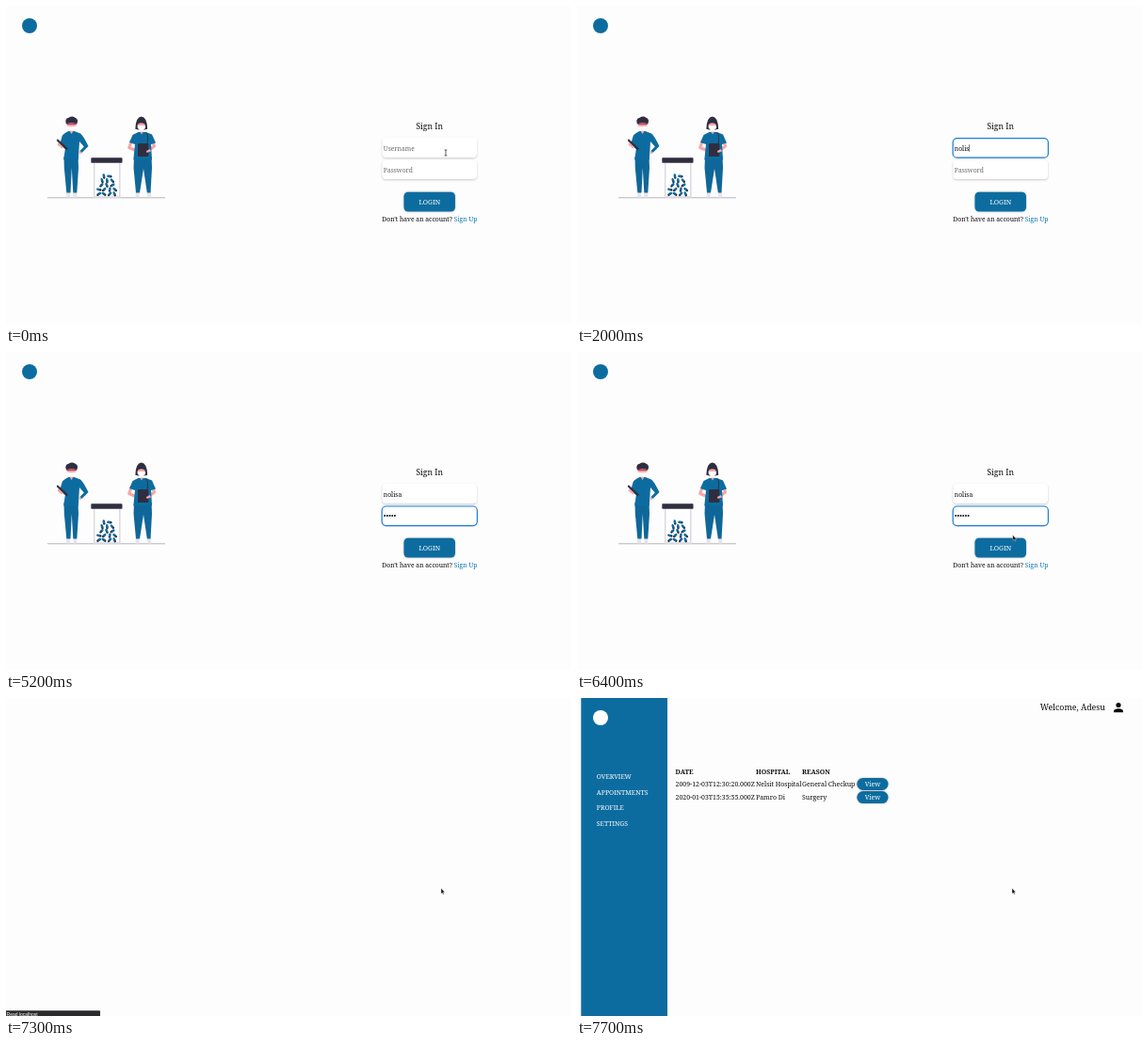
Recreate the animation shown at these times as an HTML page. Size 600 by 338 pixels, loop 8 s.

```html
<!DOCTYPE html>
<html lang="en">
<head>
<meta charset="utf-8">
<title>Sign In</title>
<style>
html, body { margin: 0; width: 100%; height: 100%; overflow: hidden; background: #fdfdfd; }
svg { display: block; width: 600px; height: 338px; font: 6.79px "Noto Serif", serif; fill: #0c0c0c; }
.field { fill: #fff; filter: drop-shadow(0 1px 1.2px #0003); }
.button { fill: #0d6c9f; filter: drop-shadow(0 .8px .9px #0004); }
.white { fill: #fff; }
.hint { fill: #6a6a6a; }
.mid { text-anchor: middle; }
#nav { font-size: 6.95px; fill: #fff; }
#table { font-size: 6.94px; }
#status text { font: 5px "Liberation Sans", Arial, sans-serif; fill: #fff; }
</style>
</head>
<body>
<svg viewBox="0 0 600 338">
  <rect width="600" height="338" fill="#fdfdfd"/>

  <g id="login">
    <circle cx="25" cy="21" r="8" fill="#0d6c9f"/>

    <g id="art">
      <path d="M44 203.800H169" stroke="#96969b" stroke-width=".7"/>
      <g id="man">
        <path d="M64.500 195h3.500v8.500h-4zM71.500 195h3.500l.5 8.500h-4z" fill="#e4e4ea"/>
        <path d="M61.500 160H76.500L77 172L75.300 198.500H71.300L69.800 172L68.500 198.500H64.300L61.800 172Z" fill="#0f6799"/>
        <path d="M66.500 133H72.500L79 135.500Q81.500 137 87.500 149L80 156.500L78 154.500L82.800 149.500L78 144L76.800 163.500H61.200L62.800 152L57 147.500L59.500 138.500Q60 136 66.500 133Z" fill="#0d6c9f"/>
        <path d="M56 144.500l5 5-1.500 2-5-4zM77.800 153.500l3 2-2.600 2.200z" fill="#f7a6a8"/>
        <path d="M54.800 141.300L66 151.500L64.500 153.200L53.600 143Z" fill="#2f2e41"/>
        <ellipse cx="69.600" cy="127" rx="4.900" ry="5.600" fill="#f7a6a8"/>
        <path d="M64.600 127.500Q69.500 129 74.600 127.500V130Q69.500 136 65 130Z" fill="#fff"/>
        <path d="M64 125.500Q61.800 120 66.500 118.800Q70 116.200 73.500 118.800Q77.500 120.500 75.200 125.500Q69.500 122.500 64 125.500Z" fill="#2f2e41"/>
        <path d="M64.500 125.300H74.800" stroke="#a33f55" stroke-width="1.500"/>
        <path d="M67.500 132.700L69.500 136L71.700 132.700" fill="#f7a6a8"/>
      </g>
      <g id="woman">
        <path d="M138 195h3.500v8.500h-4zM150 195h3.500l.8 8.500h-4z" fill="#e4e4ea"/>
        <path d="M136 160H154.500L155 172L153.500 198.500H149.800L146 173L142 198.500H138L135.500 172Z" fill="#0f6799"/>
        <path d="M133.500 143L130.700 150.500L140 154.500M155.500 143L157.500 149L151 154" fill="none" stroke="#f7a6a8" stroke-width="3.100" stroke-linejoin="round"/>
        <path d="M140.500 134H148.500L155 136.500L159 145.500L154 147L155 163.500H135.300L137 147L131 145L134.500 137Z" fill="#0d6c9f"/>
        <path d="M137.300 130.800Q137.800 118 143.700 117.600Q149.800 118 150.200 130.800Q143.700 132.500 137.300 130.800Z" fill="#2f2e41"/>
        <ellipse cx="143.700" cy="127" rx="4" ry="4.500" fill="#f7a6a8"/>
        <path d="M139 126Q139 120 143.700 120T148.500 126Q143.700 122.500 139 126Z" fill="#2f2e41"/>
        <path d="M139.600 127H148V129.800Q143.800 135.500 139.800 129.800Z" fill="#fff"/>
        <path d="M142 133.500H146L144 136.500Z" fill="#f7a6a8"/>
        <path d="M149 134.500Q151.500 138 150 146" fill="none" stroke="#2f2e41" stroke-width=".9"/>
        <rect x="140" y="146" width="11.300" height="14" rx="1" fill="#2f2e41"/>
        <path d="M149 154l4-2 1 2.500-4.500 1.500z" fill="#f7a6a8"/>
      </g>
      <path d="M93.700 167V203H120.800V167" fill="#fff" stroke="#dcdce3" stroke-width="1.600"/>
      <rect x="90.300" y="161.300" width="33.200" height="5.500" rx=".8" fill="#2f2e41"/>
      <g id="pills" stroke-width="2.400" stroke-linecap="round"></g>
    </g>

    <text class="mid" x="449.700" y="131.200" font-size="8.600">Sign In</text>
    <rect class="field" x="399.500" y="140" width="100.500" height="21" rx="4"/>
    <rect class="field" x="399.500" y="163.500" width="100.500" height="20.500" rx="4"/>
    <rect id="ring" x="399.200" width="101.200" height="20.600" rx="4.500" fill="none" stroke="#1d7fdc" stroke-width="1.200"/>
    <text id="user" x="400.800" y="153.500"></text>
    <text id="pass" class="hint" x="400.800" y="176.700">Password</text>
    <g id="dots"></g>
    <rect id="caret" width=".6" height="7.600" fill="#222"/>
    <rect class="button" x="422.500" y="197.700" width="54.500" height="20.800" rx="4.500"/>
    <text class="mid white" x="449.800" y="210.600" font-size="7.100">LOGIN</text>
    <text x="399.300" y="229.300">Don't have an account? <tspan fill="#0e77b0">Sign Up</tspan></text>
  </g>

  <g id="home">
    <rect x="4.300" width="91.700" height="338" fill="#0d6c9f"/>
    <circle class="white" cx="25" cy="21" r="8"/>
    <g id="nav"></g>
    <text x="491.700" y="13.200" font-size="8.900">Welcome, Adesu</text>
    <circle cx="575" cy="7.500" r="2.600"/>
    <path d="M570 15.200V13.700Q570.500 11.200 575 11.200T580 13.700V15.200Z"/>
    <g id="table"></g>
  </g>

  <g id="status">
    <rect x="-2" y="332.300" width="102" height="8" rx="1" fill="#2b2b2d"/>
    <text x=".6" y="337.600"></text>
  </g>

  <g id="mouse">
    <path id="beam" d="M-1.400-3H1.400M0-3V3M-1.400 3H1.400" stroke="#222" stroke-width=".7"/>
    <path id="arrow" d="M0-2.800V3L1.300 1.900L2.200 3.800L3.100 3.400L2.300 1.600H4Z" fill="#111" stroke="#fff" stroke-width=".35"/>
    <path id="hand" d="M-.8-3Q0-3.600.5-2.700V-.6L2.500 0Q3 .3 2.700 1.500L2.100 3.300H-.6L-2.200 1Q-1.800.2-.8.8Z" fill="#111" stroke="#fff" stroke-width=".45"/>
  </g>
</svg>
<script>
const $ = id => document.getElementById(id);
const add = (parent, tag, attrs, text = '') => {
  const el = document.createElementNS('http://www.w3.org/2000/svg', tag);
  for (const k in attrs) el.setAttribute(k, attrs[k]);
  el.textContent = text;
  return parent.appendChild(el);
};
const show = (id, on) => $(id).setAttribute('visibility', on ? 'inherit' : 'hidden');
const put = (el, text) => { if (el.textContent !== text) el.textContent = text; };

// A loose heap of two-tone capsules inside the jar
let seed = 11;
const rand = () => (seed = seed * 16807 % 2147483647) / 2147483647;
for (let row = 0; row < 5; row++) {
  const count = 2 + Math.ceil(row / 2);
  for (let i = 0; i < count; i++) {
    const x = 107.3 + (i - (count - 1) / 2) * 5.6 + rand() - .5;
    const y = 181 + row * 4.7, a = rand() * Math.PI;
    const dx = Math.cos(a) * 1.6, dy = Math.sin(a) * 1.5;
    add($('pills'), 'path', { d: `M${x} ${y}l${dx} ${dy}`, stroke: '#2f2e41' });
    add($('pills'), 'path', { d: `M${x} ${y}l${-dx} ${-dy}`, stroke: '#0d6c9f' });
  }
}

['OVERVIEW', 'APPOINTMENTS', 'PROFILE', 'SETTINGS'].forEach((label, i) =>
  add($('nav'), 'text', { x: 20.8, y: 86 + i * 16.65 }, label));

const columns = [104.5, 190, 239];
[
  ['DATE', 'HOSPITAL', 'REASON'],
  ['2009-12-03T12:30:20.000Z', 'Nelsit Hospital', 'General Checkup'],
  ['2020-01-03T15:35:55.000Z', 'Pamro Di', 'Surgery']
].forEach((cells, row) => {
  const y = row ? 79.7 + row * 14.2 : 81.2;
  cells.forEach((cell, i) =>
    add($('table'), 'text', { x: columns[i], y, 'font-weight': row ? 400 : 700 }, cell));
  if (!row) return;
  add($('table'), 'rect', { class: 'button', x: 297.3, y: y - 9, width: 33.2, height: 13, rx: 6.5 });
  add($('table'), 'text', { class: 'mid white', x: 314, y }, 'View');
});

const dots = Array.from({ length: 6 }, (_, i) =>
  add($('dots'), 'circle', { cx: 402.2 + i * 2.68, cy: 174.1, r: 1 }));

const LOOP = 8000, NAME = 'nolisa';
const nameKeys = [1400, 1600, 1700, 1900, 2000, 2400];
const passKeys = [3800, 4200, 4600, 4800, 5200, 5400];
const FOCUS = 400, TAB = 3400, MOVE = 5800, ARRIVE = 6600;
const SUBMIT = 6700, STATUS = 7000, BLANK = 7300, HOME = 7600, TABLE = 7700;
const typed = (keys, t) => keys.filter(k => k <= t).length;
const ease = p => p * p * (3 - 2 * p);

function drawLogin(t) {
  const sent = t >= SUBMIT;
  const focused = t >= FOCUS && !sent, onPass = t >= TAB;
  const letters = sent ? 0 : typed(nameKeys, t);
  const marks = sent ? 0 : typed(passKeys, t);
  put($('user'), letters ? NAME.slice(0, letters) : 'Username');
  $('user').setAttribute('class', letters ? '' : 'hint');
  show('pass', !marks);
  dots.forEach((dot, i) => dot.setAttribute('visibility', i < marks ? 'inherit' : 'hidden'));

  show('ring', focused);
  $('ring').setAttribute('y', onPass ? 164 : 140.6);

  // The caret blinks from the moment a field gains focus
  const sinceFocus = t - (onPass ? TAB : FOCUS);
  show('caret', focused && sinceFocus % 1200 < 600);
  const end = onPass ? marks * 2.68 : letters ? $('user').getComputedTextLength() : 0;
  $('caret').setAttribute('x', 400.8 + end);
  $('caret').setAttribute('y', onPass ? 170.3 : 147.2);
}

function drawMouse(t) {
  const p = ease(Math.min(1, Math.max(0, (t - MOVE) / (ARRIVE - MOVE))));
  const x = 467 - 5 * p, y = 156 + 49 * p;
  const onField = y < 161 || y > 163.5 && y < 184;
  const onButton = y > 198 && t < BLANK;
  show('mouse', t < nameKeys[0] || t >= MOVE);
  show('beam', onField);
  show('hand', !onField && onButton);
  show('arrow', !onField && !onButton);
  $('mouse').setAttribute('transform', `translate(${x} ${y})`);
}

function draw(now) {
  // Screen updates land on tenths of a second
  const t = Math.floor(now % LOOP / 100) * 100;
  show('login', t < BLANK);
  show('home', t >= HOME);
  show('table', t >= TABLE);
  show('status', t >= STATUS && t < HOME);
  put($('status').lastElementChild, t < BLANK ? 'localhost' : 'Read localhost');
  if (t < BLANK) drawLogin(t);
  else ['ring', 'pass', 'caret'].forEach(id => show(id, false));
  drawMouse(t);
}

const start = performance.now();
function tick() {
  draw(performance.now() - start);
  requestAnimationFrame(tick);
}
tick();
</script>
</body>
</html>
```
